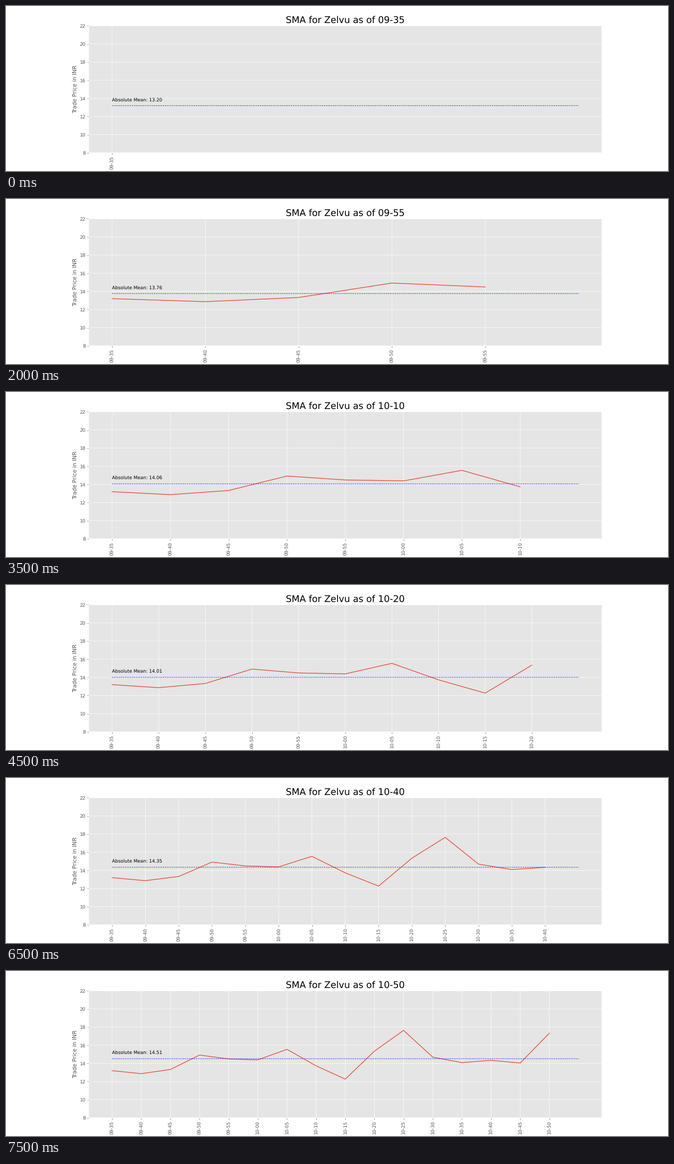
Animation of 1280x320 px, one loop 8000 ms. Source, as a matplotlib script:

```python
import matplotlib.pyplot as plt
from matplotlib.animation import FuncAnimation

plt.style.use("ggplot")
plt.rcParams.update({
    "font.family": "DejaVu Sans",
    "text.hinting": "no_hinting",
    "path.snap": False,  # keep lines at their true subpixel height
})

STOCK = "Zelvu"
START = 9 * 60 + 35  # first trade, minutes after midnight
STEP = 5
# One trade per step; means, ticks and labels all follow from these.
PRICES = [13.20, 12.87, 13.33, 14.92, 14.49, 14.39, 15.55, 13.73,
          12.27, 15.35, 17.64, 14.69, 14.09, 14.34, 14.04, 17.33]


def clock(i):
    hours, minutes = divmod(START + STEP * i, 60)
    return f"{hours:02d}-{minutes:02d}"


fig, ax = plt.subplots(figsize=(20, 5), dpi=64)


def draw(frame):
    n = frame + 1
    mean = sum(PRICES[:n]) / n
    ax.clear()
    ax.plot(range(n), PRICES[:n])
    ax.hlines(mean, 0, n, colors="blue", linestyles="dotted")
    ax.text(0, mean + 0.5, f"Absolute Mean: {mean:.2f}")
    ax.set_xticks(range(n), [clock(i) for i in range(n)], rotation=90)
    ax.set_ylim(8, 22)
    ax.set_ylabel("Trade Price in INR")
    ax.set_title(f"SMA for {STOCK} as of {clock(frame)}", fontsize=20)
    return ax.get_children()


anim = FuncAnimation(fig, draw, frames=len(PRICES), interval=500,
                     init_func=lambda: [], repeat=True, repeat_delay=0)
plt.show()
```
